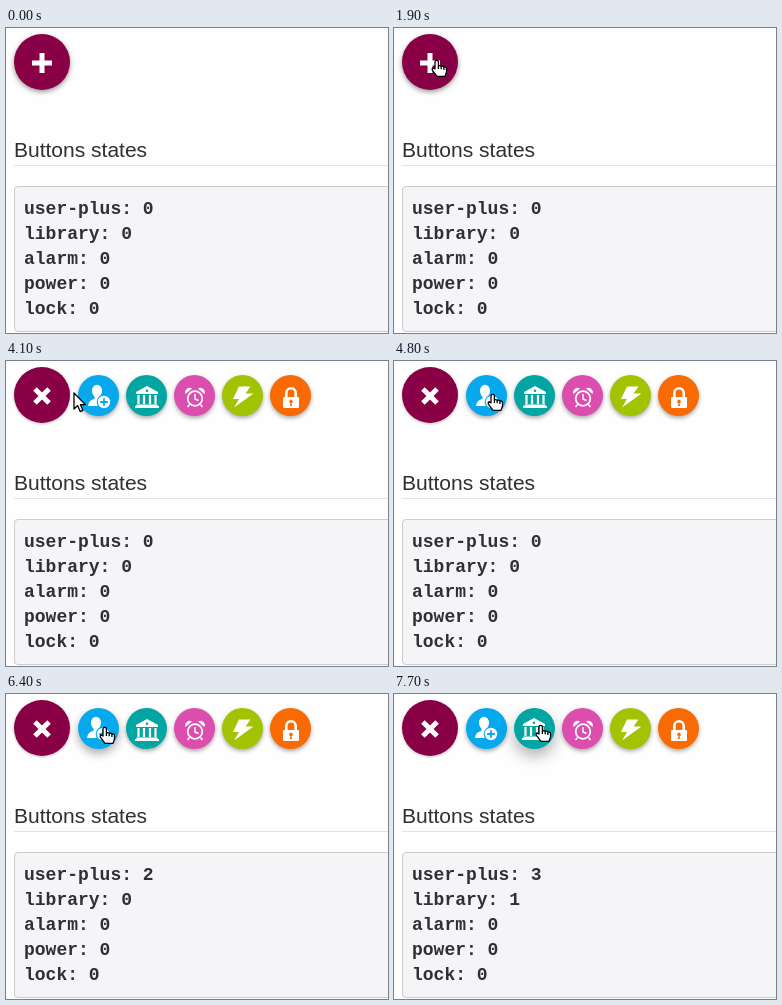
Write an HTML page that moves like this. It is 382 px wide and 305 px high and loops after 8000 ms.

```html
<!DOCTYPE html>
<html lang="en">
<head>
<meta charset="utf-8">
<title>Button states</title>
<style>
html, body { margin: 0; width: 100%; height: 100%; overflow: hidden; background: #fefefe; }
#stage { position: relative; width: 382px; height: 305px; overflow: hidden; color: #303032; }
h1 {
  position: absolute; left: 8px; top: 110px; width: 380px; height: 27px; margin: 0;
  border-bottom: 1px solid #e3e3e5;
  font: 21px/24px "Liberation Sans", Arial, sans-serif; white-space: nowrap;
}
pre {
  position: absolute; left: 8px; top: 158px; box-sizing: border-box;
  width: 400px; height: 146px; margin: 0; padding: 10px 9px;
  border: 1px solid #ccc; border-radius: 4px; background: #f5f4f6;
  font: bold 18px/25px "Liberation Mono", "Courier New", monospace;
}
.btn {
  position: absolute; left: -20.5px; top: 13.5px; width: 41px; height: 41px;
  border-radius: 50%; background: var(--c);
}
#main { left: 8px; top: 6px; width: 56px; height: 56px; background: #890046; }
svg { position: absolute; left: 50%; top: 50%; overflow: visible; width: 1px; height: 1px; }
.btn svg { fill: #fff; stroke: none; }
.btn .line { fill: none; stroke: #fff; }
.btn .cut { fill: var(--c); }
.btn .cutline { fill: none; stroke: var(--c); }
#cursor { left: 0; top: 0; fill: #fff; stroke: #000; stroke-width: 1.3; stroke-linejoin: round; }
</style>
</head>
<body>
<div id="stage">
  <div class="btn small" style="--c:#08a8ec"><svg>
    <ellipse cx="-2" cy="-5" rx="5" ry="6.2"/>
    <path d="M-4.5-1h5v4q6 1 6.5 7h-18q.5-6 6.5-7z"/>
    <circle class="cut" cx="5" cy="6" r="7.3"/>
    <circle cx="5" cy="6" r="6.2"/>
    <path class="cutline" stroke-width="1.8" d="M1.2 6h7.6M5 2.2v7.6"/>
  </svg></div>
  <div class="btn small" style="--c:#03a5a2"><svg>
    <path d="M0-10L11-4v2h-22v-2zM-10.500 8.500h21v1.500h1.500v2h-24v-2h1.500z"/>
    <path class="line" stroke-width="2.2" d="M-8.500-1V8M-3-1V8M3-1V8M8.500-1V8"/>
    <circle class="cut" cy="-5.200" r="1.300"/>
  </svg></div>
  <div class="btn small" style="--c:#dc4eae"><svg>
    <circle class="line" cy="2.500" r="7.300" stroke-width="1.700"/>
    <path class="line" stroke-width="1.500" d="M0-2v5l3.500 1.500M-5.500 8.500l-2 2.500M5.500 8.500l2 2.500"/>
    <path d="M-9.500-2a4.500 4.500 0 0 1 6.500-5.500zM9.500-2a4.500 4.500 0 0 0-6.500-5.500z"/>
  </svg></div>
  <div class="btn small" style="--c:#a1c302"><svg>
    <path d="M-4-9.500H7.500L2.500-2.500H10.500L-9 11.500L-4 3H-10z"/>
  </svg></div>
  <div class="btn small" style="--c:#f96a03"><svg>
    <path class="line" stroke-width="2.600" d="M-4.700 2v-5a4.700 4.700 0 0 1 9.400 0v5"/>
    <rect x="-8" y="1" width="16" height="11" rx="1.300"/>
    <path class="cut" d="M-1 10l.4-3a1.700 1.700 0 1 1 1.200 0l.4 3z"/>
  </svg></div>
  <div class="btn" id="main"><svg>
    <path id="plus" class="line" stroke-width="5" d="M-10 0h20M0-10v20"/>
  </svg></div>
  <h1>Buttons states</h1>
  <pre id="states"></pre>
  <svg id="cursor">
    <path id="arrow" d="M0 0v16l3.700-3.400 2.500 6 2.800-1.200-2.600-5.800h5z"/>
    <path id="hand" d="M-2 9V2a1.700 1.700 0 0 1 3.400 0v4q1.500-.8 2.800.3 1.700-.6 2.700.6 2.600-.3 2.600 2v3l-1.500 4.500h-8l-4.500-6q-1-2 .8-2.400zM1.400 6v3M4.200 6.300v3M6.900 6.900v3"/>
  </svg>
</div>
<script>
const LOOP = 8000, STEP = 100, MAIN_X = 36, MID_Y = 34;
const $ = id => document.getElementById(id);
const small = [...document.querySelectorAll('.small')];
const names = ['user-plus', 'library', 'alarm', 'power', 'lock'];

// Each row: time, values...
const route = [
  [600, 142, 4], [800, 167, 27], [1000, 167, 27], [1200, 149, 29], [1500, 96, 31],
  [1700, 61, 33], [1900, 43, 32], [4000, 43, 32], [4100, 68, 32], [4300, 91, 35],
  [4500, 100, 35], [4700, 100, 35], [4800, 99, 33], [6800, 99, 33], [6900, 110, 32],
  [7000, 123, 31], [7200, 147, 31]
];
const opening = [[2700, 0], [2800, .14], [2900, .48], [3000, .81], [3100, 1]];
const press = [
  [[5300, 0], [5500, 1], [5800, 1], [5900, 0], [6000, 0], [6200, 1], [6300, 1],
   [6400, .5], [6500, 1], [6800, 1], [6900, .15], [7100, 0]],
  [[7500, 0], [7700, 1]]
];
const clicks = [[5500, 6400, 6600], [7700]];

function at(rows, t) {
  const i = rows.findIndex(r => r[0] > t);
  if (i === 0) return rows[0].slice(1);
  if (i < 0) return rows[rows.length - 1].slice(1);
  const a = rows[i - 1], b = rows[i], k = (t - a[0]) / (b[0] - a[0]);
  return a.slice(1).map((v, j) => v + (b[j + 1] - v) * k);
}

function render(t) {
  const [open] = at(opening, t);
  const [x, y] = at(route, t);

  $('plus').setAttribute('transform', `translate(0 1) rotate(${45 * open})`);
  $('main').style.boxShadow =
    `0 ${2 - open}px ${5 - 2 * open}px rgba(0,0,0,${.42 - .17 * open})`;

  let over = Math.hypot(x - MAIN_X, y - MID_Y) < 28;
  small.forEach((b, i) => {
    const offset = 56 + 48 * i;
    const down = press[i] ? at(press[i], t)[0] : 0;
    b.style.visibility = open ? 'visible' : 'hidden';
    b.style.transform = `translateX(${MAIN_X + offset * open}px) scale(${open})`;
    b.style.boxShadow =
      `0 ${2 + 5 * down}px ${4 + 11 * down}px rgba(0,0,0,${.35 - .04 * down})`;
    if (open === 1 && Math.hypot(x - MAIN_X - offset, y - MID_Y) < 20.5) over = true;
  });

  $('cursor').style.visibility = t < 600 ? 'hidden' : 'visible';
  $('cursor').style.transform = `translate(${Math.round(x)}px, ${Math.round(y)}px)`;
  $('hand').style.display = over ? '' : 'none';
  $('arrow').style.display = over ? 'none' : '';

  $('states').textContent = names
    .map((n, i) => `${n}: ${(clicks[i] || []).filter(c => c <= t).length}`)
    .join('\n');
}

const start = performance.now();
function tick() {
  const t = (performance.now() - start) % LOOP;
  render(Math.floor(t / STEP) * STEP);
  requestAnimationFrame(tick);
}
tick();
</script>
</body>
</html>
```
